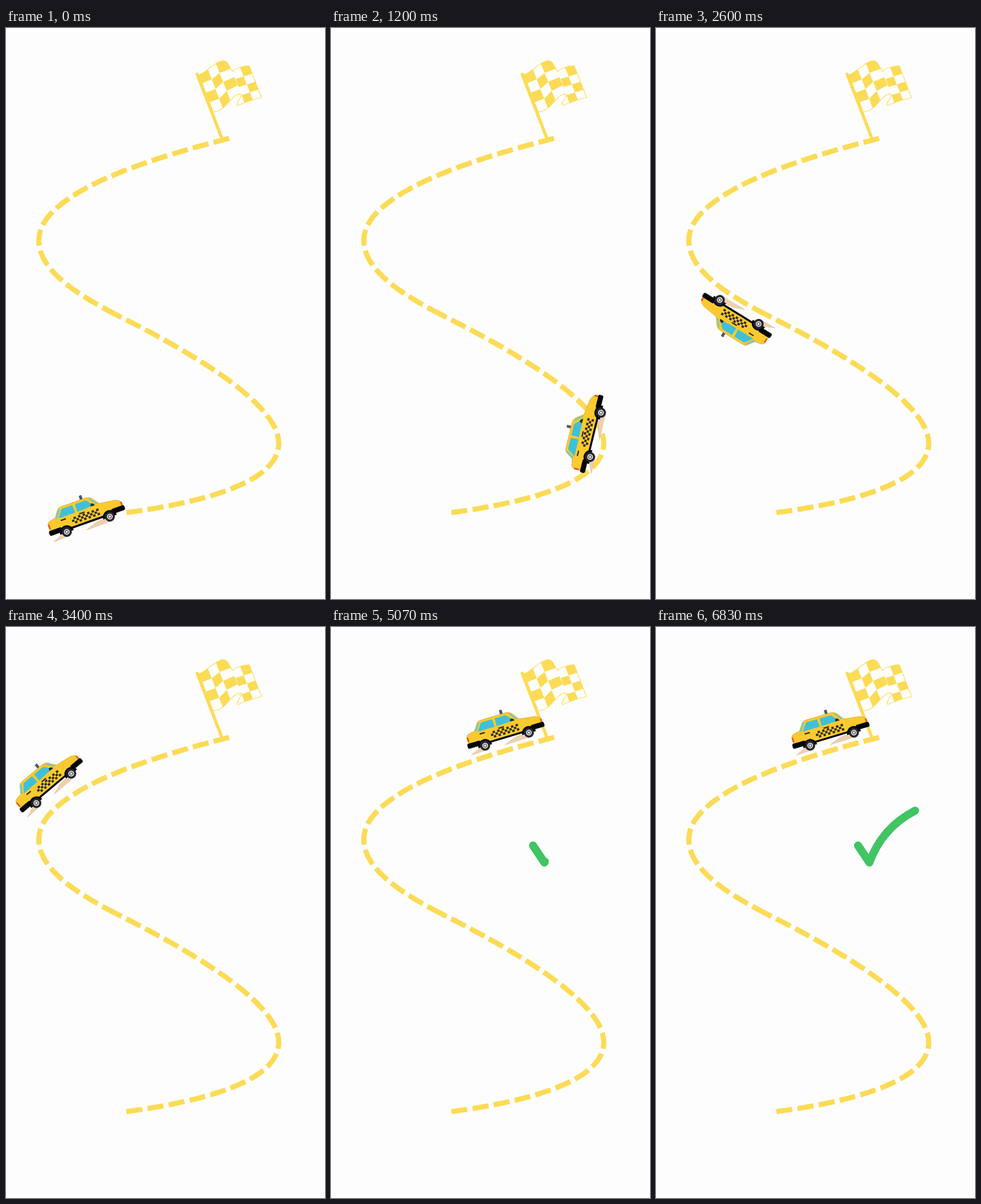
Animation of 559x1001 px, one loop 6860 ms. Source, as an HTML page:

```html
<!DOCTYPE html>
<html lang="en">
<head>
<meta charset="utf-8">
<title>Taxi route</title>
<style>
  html, body { margin: 0; width: 100%; height: 100%; overflow: hidden; background: #fdfdfd; }
  svg { display: block; width: 100%; height: 100%; }
</style>
</head>
<body>
<svg viewBox="0 0 559 1001">
  <defs>
    <path id="cloth" d="M338 82C352 78 362 62 378 57.500C390 56 390 68 397 76C405 69 415 67 426 66C434 84 440 104 448 122C432 125 420 130 406 136C402 131 412 124 413 116C396 112 388 146 363 147Z"/>
    <clipPath id="clothClip"><use href="#cloth"/></clipPath>
    <g id="wheel">
      <path d="M-12.500 1A12.500 12.500 0 0 1 12.500 1Z" fill="#07070f"/>
      <circle r="8.800" fill="#26262b"/>
      <circle r="5" fill="#f1f1f1"/>
      <circle r="3.400" fill="#55555c"/>
      <circle r="1.900" fill="#f1f1f1"/>
    </g>
  </defs>

  <g fill="none" stroke="#fcdb56" stroke-width="9" stroke-dasharray=".755 .245">
    <path pathLength="18.25" d="M211 849.500C330 834 478 800 478 728C478 664 350 581 194 503"/>
    <path pathLength="15.75" d="M194 503C124 467 57.500 425 57.500 372C57.500 290 250 229 391 193.500"/>
  </g>

  <use href="#cloth" fill="#fff"/>
  <path id="cells" fill="#fcdb56" clip-path="url(#clothClip)"/>
  <use href="#cloth" fill="none" stroke="#fcdb56" stroke-width="1.200"/>
  <path d="M335 81L378.500 194" stroke="#fcdb56" stroke-width="5.500" stroke-linecap="round"/>

  <g id="car">
    <g fill="#efd0b0" stroke="#d9b591" stroke-width=".6">
      <path d="M-67.500 9L-54 3L-46 1L-36 8Z"/>
      <path d="M-6 8.500L12 2L24 0L44 8Z"/>
    </g>
    <rect x=".5" y="-52.500" width="5" height="9.500" rx="1" fill="#555960"/>
    <path d="M-67 -10V-22Q-66 -27 -60 -28L-51 -29.500L-42 -42Q-40 -45 -35 -45H12Q18 -44.500 22 -39L30 -28L58 -24Q66 -21 68 -16V-8L50 -4H-50Z" fill="#fcca2f" stroke="#d9a63a" stroke-width=".8"/>
    <path d="M-51 -29L-41.500 -42.500L-38 -42L-47.500 -28Z" fill="#7cc9b4"/>
    <path d="M14 -43L19 -41L28.500 -28.500L24 -29Z" fill="#7cc9b4"/>
    <g fill="#40c0d8">
      <path d="M-45.500 -27L-35.500 -41H-15.500L-14.500 -27Z"/>
      <path d="M-11 -27L-10.500 -41H9Q13 -39 19 -28Z"/>
    </g>
    <path d="M14 -28L16 -33L20.500 -31L22 -27.500Z" fill="#2b2b2b"/>
    <path d="M-43.500 -22.200H-34M-9 -22.400H1" stroke="#2b2416" stroke-width="2.200"/>
    <path id="checks" fill="#2e2a20"/>
    <path d="M-66 -22.500V-14" stroke="#e5532d" stroke-width="2.600"/>
    <path d="M66.500 -18V-12" stroke="#e5532d" stroke-width="2.600"/>
    <g fill="#050508">
      <rect x="-70" y="-11.500" width="24" height="9" rx="3"/>
      <rect x="46" y="-11.500" width="24" height="9" rx="3"/>
      <rect x="-34" y="-5.500" width="68" height="3.500"/>
    </g>
    <use href="#wheel" x="-40"/>
    <use href="#wheel" x="40"/>
  </g>

  <path id="tick" pathLength="1" d="M354 383L374 413Q396 352 454 322" fill="none" stroke="#41c464" stroke-width="14" stroke-linecap="round" stroke-linejoin="round"/>
</svg>
<script>
const LOOP = 6860;
const SPEED = 0.29;            // px per ms, along the heading at each stop
const ARRIVE = 4230;
const PARKED = { x: 308.5, y: 196.5, angle: -16.6 };
const TICK_START = 4865, TICK_END = 5730;

// time, x, y, heading in degrees
const stops = [
  [0, 144, 870, -19.6],
  [600, 335, 824, -14],
  [1200, 463.5, 713.5, -76],
  [1400, 452, 662, -126],
  [1750, 370, 620, -148],
  [2100, 273, 571, -151],
  [2600, 146, 498, -148.3],
  [2800, 95, 463, -138],
  [3060, 51, 385, -92],
  [3400, 83.5, 283, -40.4],
  [3500, 108, 266, -34],
  [4200, 271, 206, -19]
];

const $ = id => document.getElementById(id);
const rad = Math.PI / 180;
const lerp = (a, b, u) => a + (b - a) * u;

function hermite(a, b, va, vb, u) {
  const c = 3 * (b - a) - 2 * va - vb;
  const d = 2 * (a - b) + va + vb;
  return { pos: a + u * (va + u * (c + u * d)), vel: va + u * (2 * c + 3 * u * d) };
}

function carAt(t) {
  if (t >= ARRIVE) return PARKED;
  let i = 0;
  while (i < stops.length - 2 && t >= stops[i + 1][0]) i++;
  const [t0, x0, y0, a0] = stops[i];
  const [t1, x1, y1, a1] = stops[i + 1];
  const u = Math.min(1, (t - t0) / (t1 - t0));
  const reach = SPEED * (t1 - t0);
  const x = hermite(x0, x1, reach * Math.cos(a0 * rad), reach * Math.cos(a1 * rad), u);
  const y = hermite(y0, y1, reach * Math.sin(a0 * rad), reach * Math.sin(a1 * rad), u);
  return { x: x.pos, y: y.pos, angle: Math.atan2(y.vel, x.vel) / rad };
}

// Flag columns: each side runs from a top point to a bottom point
function flagCells() {
  const sides = [
    [337, 80, 363, 147], [354, 73, 380, 141], [368, 63, 393, 126], [388, 57, 412, 115],
    [397, 75, 418, 132], [411, 71, 433, 127], [426, 66, 448, 122]
  ];
  const columns = [[0, 1], [1, 2], [2, 3], [4, 5], [5, 6]];
  const at = ([x0, y0, x1, y1], v) => `${lerp(x0, x1, v)} ${lerp(y0, y1, v)}`;
  let d = '';
  columns.forEach(([l, r], col) => {
    for (let row = col % 2; row < 4; row += 2) {
      const top = row ? row / 4 : -0.1;
      const end = (row + 1) / 4;
      d += `M${at(sides[l], top)}L${at(sides[r], top)}L${at(sides[r], end)}L${at(sides[l], end)}Z`;
    }
  });
  return d;
}

function doorChecks() {
  const w = 4.2, h = 3.9;
  let d = '';
  for (let row = 0; row < 3; row++)
    for (let col = (row + 1) % 2; col < 12; col += 2)
      d += `M${-25 + col * w} ${-20.5 + row * h}h${w}v${h}h${-w}z`;
  return d;
}

function draw(t) {
  const { x, y, angle } = carAt(t);
  $('car').setAttribute('transform', `translate(${x} ${y}) rotate(${angle})`);
  const p = Math.min(1, (t - TICK_START) / (TICK_END - TICK_START));
  const tick = $('tick').style;
  tick.display = p > 0 ? '' : 'none';
  tick.strokeDasharray = p < 1 ? `${Math.max(p, 0)} 2` : 'none';
}

$('cells').setAttribute('d', flagCells());
$('checks').setAttribute('d', doorChecks());

const start = performance.now();
function frame() {
  draw((performance.now() - start) % LOOP);
  requestAnimationFrame(frame);
}
draw(0);
requestAnimationFrame(frame);
</script>
</body>
</html>
```
